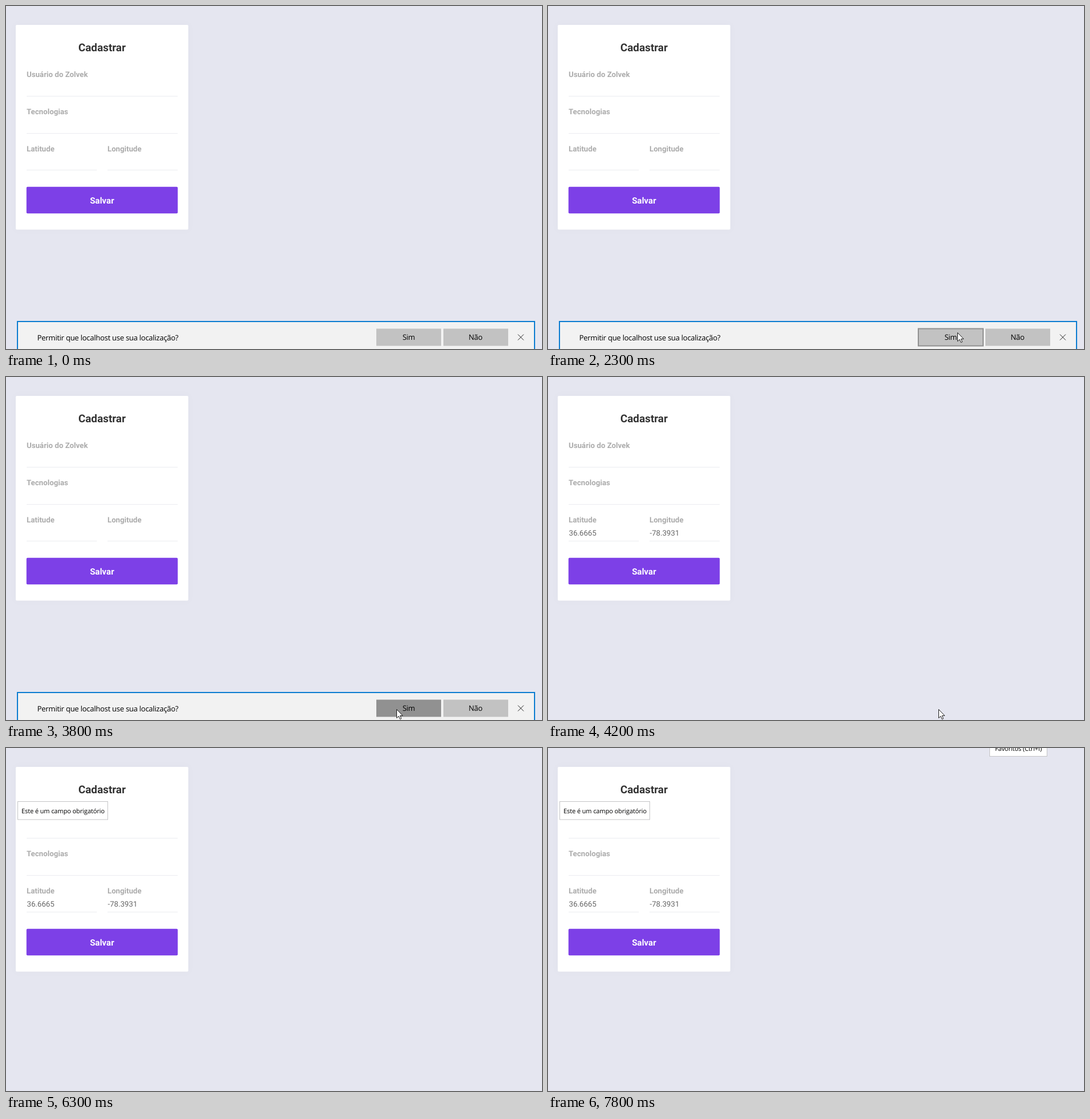
An HTML page for the animation above (8 s loop, 935 by 599 pixels).

```html
<!DOCTYPE html>
<html lang="pt-BR">
<head>
<meta charset="utf-8">
<title>Cadastrar</title>
<style>
  html, body { margin: 0; width: 100%; height: 100%; overflow: hidden; background: #e5e6f0; }
  svg { display: block; width: 935px; height: 599px; font-family: Roboto, sans-serif; text-rendering: geometricPrecision; }
  .card { fill: #fff; filter: drop-shadow(0 0 7px rgba(0, 0, 0, .02)); }
  .title { font-size: 18.8px; font-weight: 700; fill: #333; }
  .label { font-size: 13.2px; font-weight: 700; fill: #acacac; }
  .value { font-size: 13.2px; fill: #666; }
  .save { font-size: 15px; font-weight: 700; fill: #fff; }
  .mid { text-anchor: middle; }
  .rule { fill: none; stroke: #ebecf0; }
  .system { font-family: "Open Sans", "Noto Sans", sans-serif; fill: #000; }
  #bar { font-size: 13px; letter-spacing: -.27px; }
  .tip { font-size: 11px; letter-spacing: -.12px; }
  .tip rect { fill: #fff; stroke: #c4c4c6; }
  .choice { fill: #c2c2c2; }
  .choice.hover { stroke: #919191; stroke-width: 2; }
  .choice.press { fill: #919191; }
</style>
</head>
<body>
<svg viewBox="0 0 935 599">
  <rect width="935" height="599" fill="#e5e6f0"/>

  <rect class="card" x="17" y="33" width="301" height="357.5" rx="2"/>
  <text class="title mid" x="167.5" y="79">Cadastrar</text>
  <text class="label" x="36" y="124">Usuário do Zolvek</text>
  <text class="label" x="36" y="189">Tecnologias</text>
  <text class="label" x="36" y="254">Latitude</text>
  <text class="label" x="177" y="254">Longitude</text>
  <path class="rule" d="M36 157.5H299.5M36 222.5H299.5M36 286.5H158.5M177 286.5H299.5"/>
  <g id="coords" class="value">
    <text x="36.5" y="277">36.6665</text>
    <text x="177.5" y="277">-78.3931</text>
  </g>
  <rect x="35.7" y="315.7" width="263.9" height="46.6" rx="2" fill="#7d40e7"/>
  <text class="save mid" x="167.5" y="345">Salvar</text>

  <g id="bar" class="system">
    <rect x="20" y="551" width="902" height="60" fill="#f2f2f2" stroke="#0b7cd0" stroke-width="2"/>
    <text x="54.5" y="584">Permitir que localhost use sua localização?</text>
    <rect id="yes" class="choice" x="646" y="563.5" width="113" height="30"/>
    <rect id="no" class="choice" x="763" y="563.5" width="113" height="30"/>
    <text class="mid" x="702.5" y="583">Sim</text>
    <text class="mid" x="819" y="583">Não</text>
    <path d="M893 573.5l10 10m0-10l-10 10" fill="none" stroke="#222"/>
  </g>

  <g id="required" class="system tip">
    <rect x="20.5" y="93.5" width="157" height="31.5"/>
    <text x="27" y="114">Este é um campo obrigatório</text>
  </g>
  <g id="favorites" class="system tip">
    <rect x="770.5" y="-17" width="100" height="31.5"/>
    <text class="mid" x="820.5" y="4.5">Favoritos (Ctrl+I)</text>
  </g>

  <path id="cursor" d="M.5.5V15.6L4 12.3L6.4 17.6L8.7 16.6L6.4 11.4H11Z"
        fill="#fff" stroke="#111" stroke-width=".95" stroke-linejoin="round"/>
</svg>
<script>
  const LOOP = 8000, STEP = 100;
  const $ = id => document.getElementById(id);

  // Pointer moves: start, end, target x, target y.
  const moves = [
    [600, 800, 611, 474],
    [900, 1200, 786, 570],
    [1200, 1400, 767, 598],
    [1500, 1900, 824, 413],
    [1900, 2300, 714, 570],
    [2400, 2800, 685, 475],
    [2800, 3100, 681, 580],
    [4400, 4600, 211, 255],
    [4900, 5300, 104, 167],
    [5400, 5600, 96, 157],
    [6700, 6800, 892, 0]
  ];

  const within = (t, from, to) => t >= from && t < to;
  const easeOut = p => 1 - (1 - p) ** 2.3;
  const show = (id, on) => $(id).setAttribute('visibility', on ? 'visible' : 'hidden');
  const mark = (id, state) => $(id).setAttribute('class', 'choice ' + state);

  function pointerAt(t) {
    let x = 346, y = 202;
    for (const [from, to, endX, endY] of moves) {
      if (t <= from) break;
      const p = easeOut(Math.min(1, (t - from) / (to - from)));
      x += (endX - x) * p;
      y += (endY - y) * p;
    }
    return [Math.round(x), Math.round(y)];
  }

  const inside = (left, [x, y]) => within(x, left, left + 113) && within(y, 564, 594);

  function render(time) {
    const t = Math.floor(time / STEP) * STEP;
    const now = pointerAt(t), before = pointerAt(t - STEP);
    // Hover appears one step after the pointer enters.
    const hover = left => inside(left, now) && inside(left, before) ? 'hover' : '';

    $('cursor').setAttribute('transform', `translate(${now})`);
    show('cursor', within(t, 400, 6300) || within(t, 6800, 7000));
    mark('yes', t >= 3700 ? 'press' : hover(646));
    mark('no', hover(763));
    show('bar', t < 3900);
    show('coords', t >= 4200);
    show('required', t >= 6300);
    show('favorites', t >= 7800);
  }

  const start = performance.now();
  function tick() {
    render((performance.now() - start) % LOOP);
    requestAnimationFrame(tick);
  }
  tick();
</script>
</body>
</html>
```
